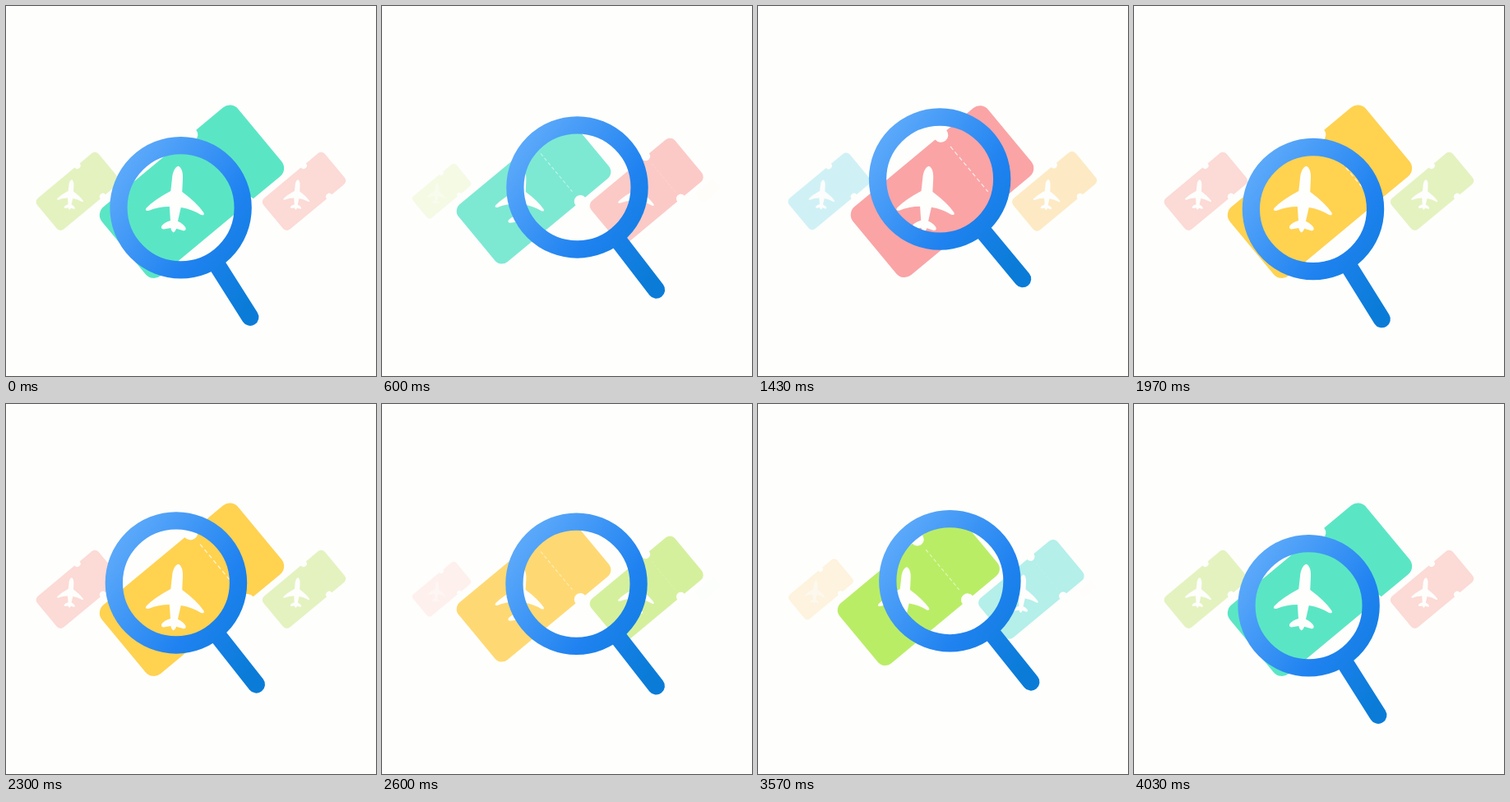
These frames come from a looping animation (450x450 px, 4.06 s). An HTML page with a canvas:

```html
<!DOCTYPE html>
<html lang="en">
<head>
<meta charset="utf-8">
<title>Flight search</title>
<style>
  html, body { margin: 0; width: 100%; height: 100%; overflow: hidden; background: #fefefc; }
  canvas { display: block; width: 100vw; height: 100vh; }
</style>
</head>
<body>
<canvas id="stage"></canvas>
<script>
const SIZE = 450, LOOP = 4060, FRAMES = 121;
const STEP = 30, TURN = FRAMES / 4; // frames per ticket change and per turn of the glass
const PAPER = '#fefefc';
const canvas = document.getElementById('stage');
const ctx = canvas.getContext('2d');
const density = Math.max(1, window.devicePixelRatio || 1);
canvas.width = canvas.height = SIZE * density;

// colour in the middle, colour at the sides
const tickets = [
  [[90, 230, 196], [206, 241, 245]],
  [[250, 163, 165], [252, 218, 213]],
  [[255, 210, 80], [253, 234, 198]],
  [[174, 236, 76], [228, 242, 192]]
];

// x and scale at the slots -2 .. 2
const slots = [[38, 0], [87.3, 0.452], [226, 1], [362.5, 0.452], [411, 0]];

const lerp = (a, b, t) => a + (b - a) * t;
const clamp = x => Math.min(1, Math.max(0, x));
const smooth = x => x * x * (3 - 2 * x);
const rad = deg => deg * Math.PI / 180;
const mix = (a, b, t) => `rgb(${a.map((v, i) => Math.round(lerp(v, b[i], t))).join()})`;

function ticketShape() {
  const w = 107.5, h = 54.4, r = 13, notch = 43, n = 9;
  const p = new Path2D();
  p.moveTo(-w + r, -h);
  p.lineTo(notch - n, -h);
  p.arc(notch, -h, n, Math.PI, 0, true);
  p.arcTo(w, -h, w, h, r);
  p.arcTo(w, h, -w, h, r);
  p.lineTo(notch + n, h);
  p.arc(notch, h, n, 0, Math.PI, true);
  p.arcTo(-w, h, -w, -h, r);
  p.arcTo(-w, -h, w, -h, r);
  p.closePath();
  return p;
}

function planeShape() {
  const p = new Path2D();
  for (const s of [1, -1]) {
    p.moveTo(0, -41);
    p.bezierCurveTo(s * 4, -40, s * 6.5, -33, s * 6.5, -26);
    p.lineTo(s * 7, -10);
    p.quadraticCurveTo(s * 26, 2, s * 35, 13);
    p.quadraticCurveTo(s * 37, 17, s * 32, 16);
    p.quadraticCurveTo(s * 20, 10, s * 7, 9);
    p.lineTo(s * 4.5, 26);
    p.quadraticCurveTo(s * 12, 29, s * 14.5, 33);
    p.quadraticCurveTo(s * 16, 37, s * 12, 37);
    p.lineTo(s * 3.5, 35);
    p.quadraticCurveTo(s * 2.5, 39, 0, 40);
    p.closePath();
  }
  return p;
}

const ticketPath = ticketShape();
const planePath = planeShape();

function drawTicket(colours, q) {
  const i = Math.min(3, Math.floor(q + 2)), f = q + 2 - i;
  const x = lerp(slots[i][0], slots[i + 1][0], f);
  const scale = lerp(slots[i][1], slots[i + 1][1], f);
  const away = Math.abs(q);
  if (scale < 0.01) return;

  ctx.save();
  ctx.globalAlpha = away > 1 ? Math.pow(2 - away, 2.5) : 1;
  ctx.translate(x, lerp(225, 225.7, scale));
  ctx.scale(scale, scale);
  ctx.save();
  ctx.rotate(rad(-39.7));
  ctx.fillStyle = mix(colours[0], colours[1], clamp(away));
  ctx.fill(ticketPath);
  ctx.strokeStyle = `rgba(255,255,250,${0.8 * clamp(1 - away)})`;
  ctx.lineWidth = 1.2;
  ctx.setLineDash([5, 3.5]);
  ctx.beginPath();
  ctx.moveTo(43, -36);
  ctx.lineTo(43, 36);
  ctx.stroke();
  ctx.restore();
  ctx.translate(-19.5, 9.8);
  ctx.rotate(rad(4.5));
  ctx.fillStyle = PAPER;
  ctx.fill(planePath);
  ctx.restore();
}

function drawGlass(turns) {
  const a = rad(118 + 360 * turns);
  const tilt = rad(54.2 + 3.9 * Math.sin(a));
  const dx = Math.cos(tilt), dy = Math.sin(tilt);

  ctx.save();
  ctx.translate(221.2 + 18.4 * Math.cos(a), 229 + 18.4 * Math.sin(a));
  const paint = ctx.createLinearGradient(-85, -25, 90, 105);
  paint.addColorStop(0, '#5aa8fa');
  paint.addColorStop(0.6, '#1f82f0');
  paint.addColorStop(1, '#0a7cd8');
  ctx.strokeStyle = paint;
  ctx.lineWidth = 21.3;
  ctx.beginPath();
  ctx.arc(0, 0, 75.6, 0, Math.PI * 2);
  ctx.stroke();
  ctx.lineCap = 'round';
  ctx.lineWidth = 21;
  ctx.beginPath();
  ctx.moveTo(dx * 78, dy * 78);
  ctx.lineTo(dx * 157.6, dy * 157.6);
  ctx.stroke();
  ctx.restore();
}

function draw(ms) {
  // thirty pictures a second
  const frame = Math.min(FRAMES, Math.floor((ms % LOOP + 3.4) * 0.03));
  const cycle = Math.floor(frame / STEP) % 4;
  const move = smooth(clamp((frame % STEP - 11.8) / 17.1));

  ctx.setTransform(density, 0, 0, density, 0, 0);
  ctx.fillStyle = PAPER;
  ctx.fillRect(0, 0, SIZE, SIZE);
  tickets
    .map((colours, i) => ({ colours, q: (i - cycle + 5) % 4 - 1 - move }))
    .sort((a, b) => Math.abs(b.q) - Math.abs(a.q))
    .forEach(t => drawTicket(t.colours, t.q));
  drawGlass(frame / TURN);
}

const start = performance.now();
function tick() {
  draw(performance.now() - start);
  requestAnimationFrame(tick);
}
tick();
</script>
</body>
</html>
```
